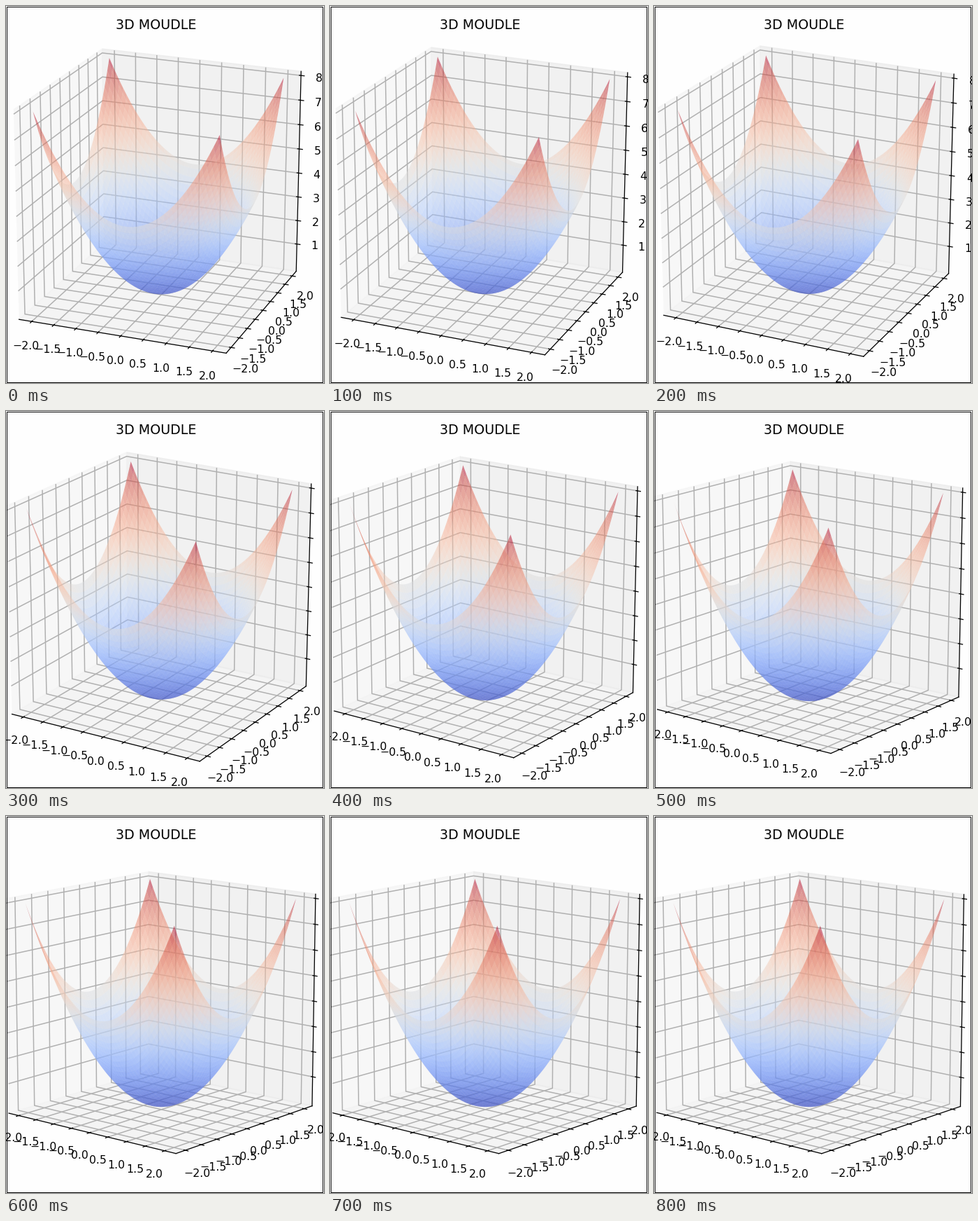
These frames come from a looping animation (455 by 538 pixels, 0.9 s). A matplotlib script:

```python
import numpy as np
import matplotlib.pyplot as plt
from matplotlib.animation import FuncAnimation
from matplotlib.patches import Rectangle

W, H, DPI = 455, 538, 128
STEP, FRAMES = 100, 9
K = 113.75 / DPI            # point scale of text and lines
SIDE = 553.5                # side of the square axes, px
LEFT, BOTTOM = -61.9, -14.8

plt.rcParams.update({
    "font.family": "DejaVu Sans",
    "font.size": 10 * K,
    "axes.linewidth": 0.8 * K,
    "grid.linewidth": 0.95 * K,
    "grid.color": "#b0b0b0",
    "xtick.major.width": 0.8 * K,
    "ytick.major.width": 0.8 * K,
})

# Camera path of the mouse drag: time in ms, elevation, azimuth
TIMES = [0, 200, 300, 400, 600, 800]
ELEV = [20.5, 21.5, 20.1, 17.6, 12.7, 12.7]
AZIM = [-68.7, -64.6, -58.7, -55.0, -50.1, -49.3]


def padded(low, high):
    """Limits with the small gap between data range and box."""
    gap = (high - low) / 48
    return low - gap, high + gap


fig = plt.figure(figsize=(W / DPI, H / DPI), dpi=DPI, facecolor="#fefefe")
ax = fig.add_axes([LEFT / W, BOTTOM / H, SIDE / W, SIDE / H],
                  projection="3d")
ax.patch.set_visible(False)

u = np.linspace(-2, 2, 100)
x, y = np.meshgrid(u, u)
ax.plot_surface(x, y, x**2 + y**2, rcount=50, ccount=50,
                cmap="coolwarm", alpha=0.5, linewidth=0.45)

ax.set_xlim(*padded(-2.2, 2.2))
ax.set_ylim(*padded(-2.2, 2.2))
ax.set_zlim(*padded(0, 8))
ax.set_box_aspect((1, 1, 1), zoom=3**0.5 / 1.8294640721620434)

ax.set_xticks(np.arange(-2, 2.1, 0.5))
ax.set_yticks(np.arange(-2, 2.1, 0.5))
ax.set_zticks(range(1, 9))
ax.tick_params(pad=12.3 * K - 8)
for axis in (ax.xaxis, ax.yaxis, ax.zaxis):
    for label in axis.get_ticklabels():
        label.set(ha="center", va="top")

fig.text(214.5 / W, 1 - 33 / H, "3D MOUDLE", size=12 * K,
         ha="center", va="baseline")
fig.add_artist(Rectangle((1.5 / W, 0.5 / H), 452 / W, 536 / H, fill=False,
                         edgecolor="black", linewidth=72 / DPI, snap=False,
                         transform=fig.transFigure))


def update(i):
    t = i * STEP
    ax.view_init(elev=np.interp(t, TIMES, ELEV),
                 azim=np.interp(t, TIMES, AZIM))
    return []


anim = FuncAnimation(fig, update, frames=FRAMES, interval=STEP,
                     repeat=True, repeat_delay=0, blit=False)
plt.show()
```
